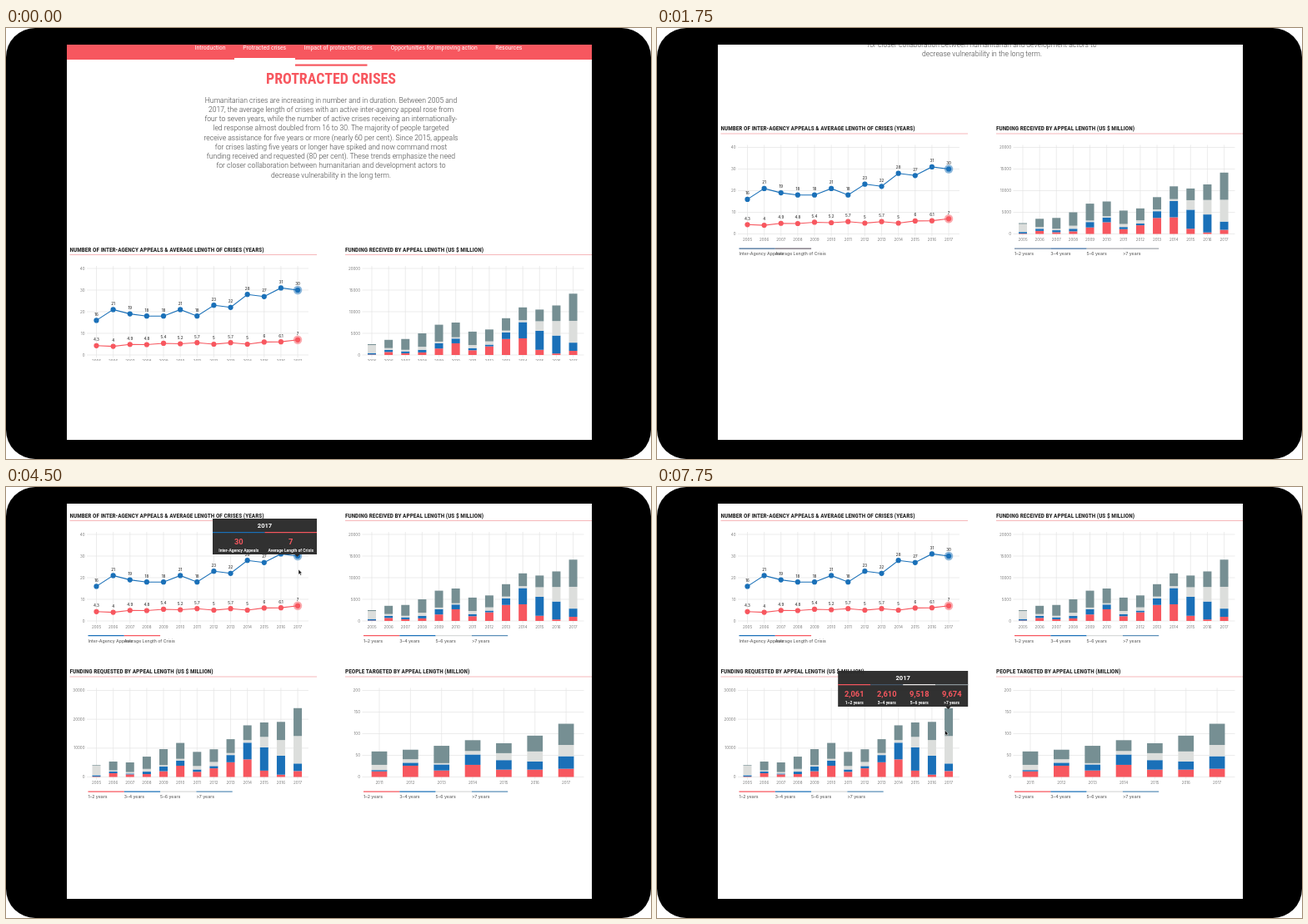
An HTML page that plays this animation: 774x518 px, repeating every 8 s.

```html
<!DOCTYPE html>
<html lang="en">
<head>
<meta charset="utf-8">
<title>Protracted crises</title>
<style>
html, body { margin: 0; width: 100%; height: 100%; overflow: hidden; background: #fff; }
svg { display: block; width: 774px; height: 518px; }
</style>
</head>
<body>
<svg id="stage" viewBox="0 0 774 518" xmlns="http://www.w3.org/2000/svg"></svg>
<script>
const LOOP = 8000, STEP = 250;
const RED = '#f7575f', BLUE = '#1a70b8', LIGHT = '#dcdedc', GREY = '#768f93';
const STACK = [RED, BLUE, LIGHT, GREY];
const LEGEND = [RED, BLUE, '#d8dada', '#5b8fb8'];
const ROBOTO = 'Roboto, sans-serif';
const NARROW = "'Roboto Condensed', Roboto, sans-serif";
const INTER = 'Inter, sans-serif';
const YEARS = ['1–2 years', '3–4 years', '5–6 years', '>7 years'];
const LEFT = 76.5, RIGHT = 407;

const svg = document.getElementById('stage');

function el(parent, tag, attrs = {}) {
  const node = document.createElementNS('http://www.w3.org/2000/svg', tag);
  for (const k in attrs) node.setAttribute(k, attrs[k]);
  parent.appendChild(node);
  return node;
}
const rect = (p, x, y, width, height, fill) => el(p, 'rect', { x, y, width, height, fill });
const line = (p, x1, y1, x2, y2, stroke, w) =>
  el(p, 'line', { x1, y1, x2, y2, stroke, 'stroke-width': w });
const group = p => el(p, 'g');

// y is the middle of the capitals
function text(p, str, x, y, size, fill, opt = {}) {
  const node = el(p, 'text', {
    x, y: y + size * 0.355, fill, 'font-size': size,
    'font-family': opt.font || ROBOTO, 'font-weight': opt.weight || 400,
    'text-anchor': opt.anchor || 'middle'
  });
  node.textContent = str;
  return node;
}

// condensed face, or Roboto narrowed by the same ratio where it is missing
const ctx = document.createElement('canvas').getContext('2d');
function measure(font) {
  ctx.font = 'bold 100px ' + font;
  return ctx.measureText('PROTRACTED CRISES').width;
}
const squeeze = Math.min(1, 0.885 * measure(ROBOTO) / measure(NARROW));
function condensed(p, str, x, y, size, fill, anchor) {
  const g = el(p, 'g', { transform: `translate(${x} ${y}) scale(${squeeze} 1)` });
  text(g, str, 0, 0, size, fill, { font: NARROW, weight: 700, anchor });
}

// ---- charts: y = 0 is the middle of the chart title ----
const TOP = 23, BASE = 127, SPAN = BASE - TOP;
const yearsFrom = (first, n) => Array.from({ length: n }, (_, i) => first + i);

function frame(p, x, title, max, ticks, labels, first, gap) {
  const g = group(p);
  condensed(g, title, x, 0, 7.3, '#222', 'start');
  line(g, x, 6.5, x + 296.5, 6.5, '#f4a5a9', 0.8);
  for (let i = 0; i <= ticks; i++) {
    const y = BASE - SPAN * i / ticks;
    line(g, x + 20.5, y, x + 286.5, y, '#e4e4e4', 0.7);
    text(g, max * i / ticks, x + 18, y, 4.5, '#777', { font: INTER, anchor: 'end' });
  }
  labels.forEach((label, i) => {
    const cx = x + first + i * gap;
    line(g, cx, TOP - 3, cx, BASE + 3, '#e4e4e4', 0.7);
    text(g, label, cx, BASE + 7.2, 4.5, '#777', { font: INTER });
  });
  return g;
}

function legend(g, x, names, colors) {
  return names.map((name, i) => {
    const lx = x + 22 + i * 43.3;
    text(g, name, lx, 150.7, 5.2, '#666', { font: INTER, weight: 500, anchor: 'start' });
    return line(g, lx, 144.6, lx + 43.3, 144.6, colors[i], 1.1);
  });
}

function bars(p, x, title, max, ticks, data, firstYear, first, gap, width) {
  const g = frame(p, x, title, max, ticks, yearsFrom(firstYear, data.length), first, gap);
  data.forEach((parts, i) => {
    let y = BASE;
    parts.forEach((v, k) => {
      const h = v * SPAN / max;
      y -= h;
      rect(g, x + first + i * gap - width / 2, y, width, h, STACK[k]);
    });
  });
  return legend(g, x, YEARS, LEGEND);
}

function series(g, values, color) {
  const pts = values.map((v, i) => [LEFT + 32 + i * 20.13, BASE - v * SPAN / 40]);
  el(g, 'polyline', { points: pts.join(' '), fill: 'none', stroke: color, 'stroke-width': 1.1 });
  pts.forEach(([cx, cy], i) => {
    if (i === pts.length - 1)
      el(g, 'circle', { cx, cy, r: 5.2, fill: color, 'fill-opacity': 0.5 });
    el(g, 'circle', { cx, cy, r: 3.1, fill: color });
    text(g, values[i], cx, cy - 7.2, 4.5, '#333', { font: INTER, weight: 500 });
  });
}

const appeals = [16, 21, 19, 18, 18, 21, 18, 23, 22, 28, 27, 31, 30];
const lengths = [4.3, 4, 4.9, 4.8, 5.4, 5.2, 5.7, 5, 5.7, 5, 6, 6.1, 7];
const received = [
  [100, 350, 1850, 200], [700, 500, 400, 1900], [400, 450, 350, 2500], [600, 600, 700, 3100],
  [1500, 1250, 350, 3900], [2700, 1100, 300, 3400], [1100, 500, 700, 3100],
  [2000, 400, 750, 2750], [3700, 1550, 400, 2850], [3850, 3750, 450, 2950],
  [1200, 4400, 2200, 2700], [350, 4150, 3350, 3600], [958, 1900, 5035, 6280]
];
const requested = [
  [150, 450, 3300, 200], [1300, 600, 400, 3050], [900, 300, 500, 3350], [1000, 850, 950, 4250],
  [2000, 1600, 500, 5550], [3900, 1800, 600, 5500], [1800, 800, 1200, 4900],
  [3000, 800, 1400, 4400], [5100, 2500, 700, 4800], [6100, 5800, 900, 5100],
  [2200, 8100, 3600, 5000], [800, 6600, 5400, 6300], [2061, 2610, 9518, 9674]
];
const people = [
  [13, 3, 12, 31], [26, 7, 8, 22], [15, 14, 3, 40], [28, 24, 8, 25],
  [17, 22, 16, 23], [17, 19, 23, 36.5], [19, 29, 26, 49]
];

// ---- static parts ----
rect(svg, 0, 0, 774, 518, '#000').setAttribute('rx', 35);
rect(svg, 73, 20, 630, 475, '#fff');
const clip = el(el(svg, 'defs'), 'clipPath', { id: 'view' });
rect(clip, 73, 20, 630, 380, '#000');
const view = el(svg, 'g', { 'clip-path': 'url(#view)' });
const page = group(view);

rect(page, 347, -222.5, 86.5, 2.2, RED);
condensed(page, 'PROTRACTED CRISES', 390, -205.7, 17.9, RED, 'middle');
[
  'Humanitarian crises are increasing in number and in duration. Between 2005 and',
  '2017, the average length of crises with an active inter-agency appeal rose from',
  'four to seven years, while the number of active crises receiving an internationally-',
  'led response almost doubled from 16 to 30. The majority of people targeted',
  'receive assistance for five years or more (nearly 60 per cent). Since 2015, appeals',
  'for crises lasting five years or longer have spiked and now command most',
  'funding received and requested (80 per cent). These trends emphasize the need',
  'for closer collaboration between humanitarian and development actors to',
  'decrease vulnerability in the long term.'
].forEach((str, i) => text(page, str, 390, -179.5 + i * 11.25, 8.6, '#444', { weight: 300 }));

const upper = group(page), lower = group(page);
const trend = frame(upper, LEFT, 'NUMBER OF INTER-AGENCY APPEALS & AVERAGE LENGTH OF CRISES (YEARS)',
  40, 4, yearsFrom(2005, 13), 32, 20.13);
series(trend, appeals, BLUE);
series(trend, lengths, RED);
const keysA = legend(trend, LEFT, ['Inter-Agency Appeals', 'Average Length of Crisis'], [BLUE, RED]);
const keysB = bars(upper, RIGHT, 'FUNDING RECEIVED BY APPEAL LENGTH (US $ MILLION)',
  20000, 4, received, 2005, 32, 20.13, 10);
bars(lower, LEFT, 'FUNDING REQUESTED BY APPEAL LENGTH (US $ MILLION)',
  30000, 3, requested, 2005, 32, 20.13, 10);
bars(lower, RIGHT, 'PEOPLE TARGETED BY APPEAL LENGTH (MILLION)',
  200, 4, people, 2011, 41, 37.35, 18.7);

const keyLines = [...keysA, ...keysB];
const fullKeys = [BLUE, RED, ...LEGEND];
const dimKeys = ['#3d6793', '#6d6570', '#6d86a3', '#3f6fa3', '#a9a9ae', '#a0a4aa'];

const nav = group(view);
rect(nav, 73, 8, 630, 30, RED);
rect(nav, 274, 36, 73, 2, '#fff');
[['Introduction', 245], ['Protracted crises', 310.2], ['Impact of protracted crises', 398.7],
 ['Opportunities for improving action', 513.7], ['Resources', 603.3]]
  .forEach(([str, x]) => text(nav, str, x, 23.4, 6.85, '#fff'));

// ---- tooltips ----
function tooltip(x, y, colWidth, values, names, colors, tipX) {
  const g = group(view), w = colWidth * values.length;
  rect(g, x, y, w, 43, '#2b2b2b').setAttribute('fill-opacity', 0.97);
  el(g, 'path', { d: `M${tipX - 3} ${y + 43}h6l-3 3z`, fill: '#2b2b2b' });
  text(g, '2017', x + w / 2, y + 8, 7.6, '#fff', { weight: 700 });
  values.forEach((v, i) => {
    const cx = x + (i + 0.5) * colWidth;
    rect(g, x + i * colWidth, y + 16, colWidth, 1.2, colors[i]);
    text(g, v, cx, y + 27.5, 9.3, RED, { weight: 700 });
    text(g, names[i], cx, y + 38, 4.95, '#fff', { weight: 700 });
  });
  return g;
}
const tipColors = [RED, '#45586a', '#eee', '#8b9699'];
const tips = [
  [4000, 4750, tooltip(248, 38, 62.5, ['30', '7'],
    ['Inter-Agency Appeals', 'Average Length of Crisis'], [BLUE, RED], 349.5)],
  [5250, 6500, tooltip(548, 42, 39, ['958', '1,900', '5,035', '6,280'], YEARS, tipColors, 680.5)],
  [7000, LOOP, tooltip(217.2, 221, 39, ['2,061', '2,610', '9,518', '9,674'], YEARS, tipColors, 349.5)]
];

const cursor = el(view, 'path', {
  d: 'M0 0V6.2L1.4 5L2.4 7.3L3.5 6.8L2.5 4.6H4.4Z',
  fill: '#111', stroke: '#fff', 'stroke-width': 0.5
});

// ---- motion ----
const scroll = [[0, 266], [250, 263.5], [500, 262.7], [750, 262.5], [1000, 259], [1250, 231],
  [1500, 174], [1750, 120.5], [2000, 88], [2250, 64], [2500, 54.5], [2750, 43], [3000, 36.5], [3250, 34]];
const navShift = [[0, 0], [500, -18]];
const fade = [[2000, 0], [2250, 0.55], [2500, 0.88], [2750, 1]];
const rise = [[2000, 18], [2250, 8], [2500, 2], [2750, 0]];
const path = [[4000, 353, 89], [4500, 351, 99], [4750, 490, 128], [5000, 681, 151], [5750, 675.5, 160],
  [6000, 675, 176], [6250, 670, 203], [6500, 570, 245], [7000, 350, 287], [7500, 345.5, 290.5], [7750, 345.5, 292.3]];

function at(keys, t, k = 1) {
  let i = keys.findIndex(key => key[0] > t);
  if (i < 0) return keys[keys.length - 1][k];
  if (i === 0) return keys[0][k];
  const a = keys[i - 1], b = keys[i];
  return a[k] + (b[k] - a[k]) * (t - a[0]) / (b[0] - a[0]);
}
const move = (node, x, y) => node.setAttribute('transform', `translate(${x} ${y})`);
const show = (node, on) => node.setAttribute('visibility', on ? 'visible' : 'hidden');

function draw(t) {
  move(page, 0, at(scroll, t));
  move(nav, 0, at(navShift, t));
  show(nav, t < 500);
  move(lower, 0, 187.5 + at(rise, t));
  lower.setAttribute('opacity', at(fade, t));
  const keys = t < 2750 ? dimKeys : fullKeys;
  keyLines.forEach((node, i) => node.setAttribute('stroke', keys[i]));
  tips.forEach(([from, to, node]) => show(node, t >= from && t < to));
  show(cursor, t >= 4000);
  move(cursor, at(path, t, 1), at(path, t, 2));
}

const start = performance.now();
function tick() {
  const t = (performance.now() - start) % LOOP;
  draw(Math.floor(t / STEP) * STEP);
  requestAnimationFrame(tick);
}
tick();
</script>
</body>
</html>
```
